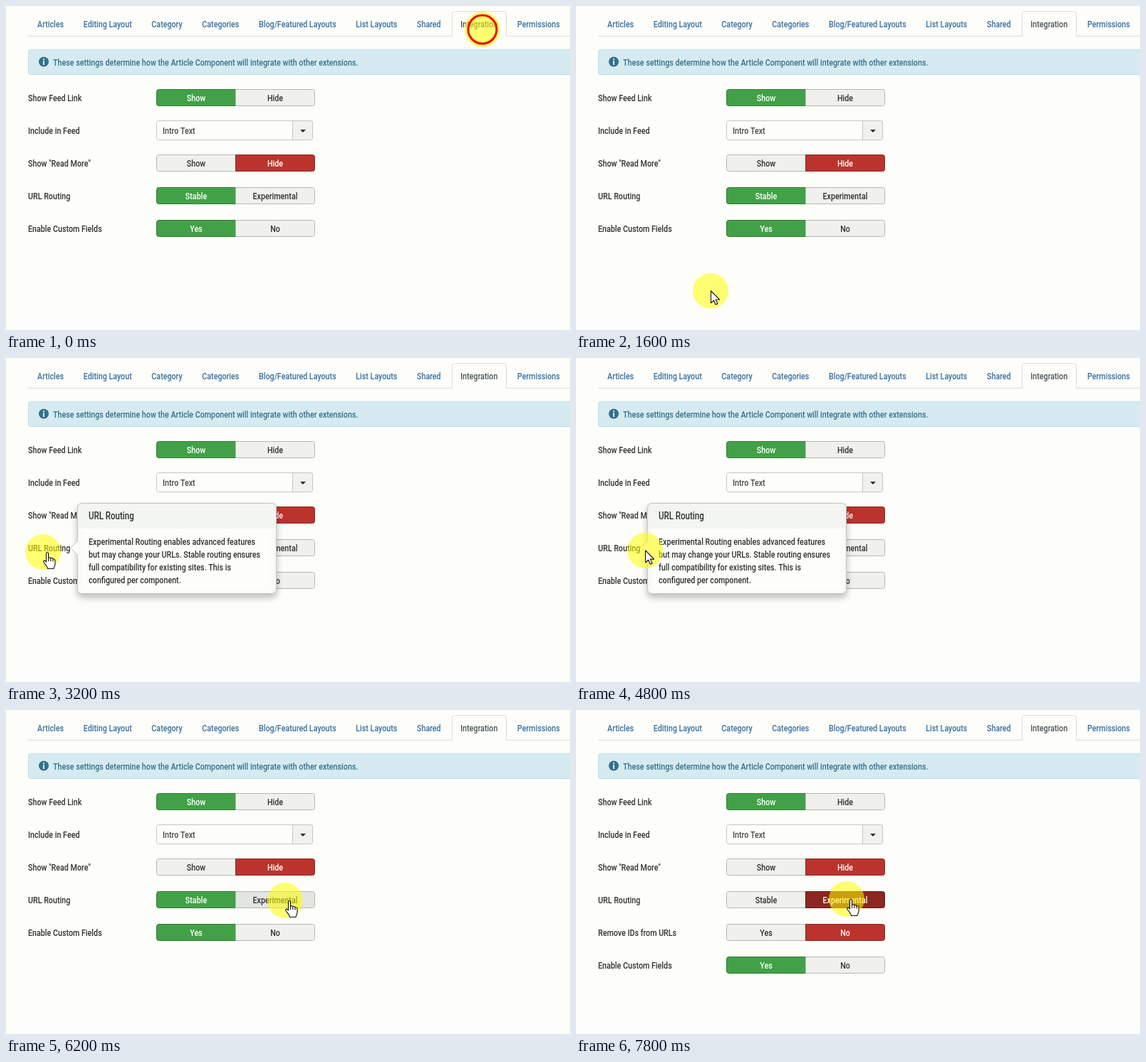
These frames come from a looping animation (792x456 px, 8000 ms). An HTML page with a canvas:

```html
<!DOCTYPE html>
<html lang="en">
<head>
<meta charset="utf-8">
<title>Integration settings</title>
<style>
html, body { margin: 0; width: 792px; height: 456px; overflow: hidden; background: #fdfef9; }
canvas { display: block; }
</style>
</head>
<body>
<canvas id="stage" width="792" height="456"></canvas>
<script>
const ctx = document.getElementById('stage').getContext('2d');
const LOOP = 8000, STEP = 200, CONDENSE = 0.824, ROW = 46;
const PAGE = '#fdfef9', INK = '#2f3230', LINK = '#3670a3', LINE = '#dcdfd9';
const INFO = ['#d5ebf1', '#bcdfe8'], INFO_INK = '#34708d';

// button styles: fill, border, text
const GREEN = ['#42a147', '#2f7c35', '#fff'], RED = ['#bb332c', '#8d2822', '#fff'];
const DARK_RED = ['#8c2721', '#671c18', '#fff'];
const OFF = ['#f0f1ed', '#b4b8b6', INK], HOVER = ['#e2e5e1', '#b4b8b6', INK];

const TABS = ['Articles', 'Editing Layout', 'Category', 'Categories', 'Blog/Featured Layouts',
  'List Layouts', 'Shared', 'Integration', 'Permissions'];

// pointer legs: start and end time, target, optional bend
const START = [669, 33];
const LEGS = [
  { from: 200, to: 1600, at: [189, 401], bend: [680, 440] },
  { from: 1600, to: 2400, at: [46, 279], bend: [5, 290] },
  { from: 2400, to: 2800, at: [52, 273] },
  { from: 4600, to: 5200, at: [226, 265] },
  { from: 5200, to: 6200, at: [392, 268] },
  { from: 6200, to: 7000, at: [380, 266] },
];

const clamp = v => Math.max(0, Math.min(1, v));
const progress = (t, from, to) => clamp((t - from) / (to - from));
const ease = k => k * k * (3 - 2 * k);

function pointerAt(t) {
  let pos = START;
  for (const { from, to, at, bend } of LEGS) {
    if (t < from) break;
    const k = ease(progress(t, from, to));
    pos = pos.map((p, i) => {
      const mid = bend ? bend[i] : (p + at[i]) / 2;
      return p * (1 - k) ** 2 + 2 * mid * k * (1 - k) + at[i] * k * k;
    });
  }
  return pos;
}

function setFont(size = 13) {
  ctx.font = `500 ${size}px Roboto, "Liberation Sans", sans-serif`;
}

// one condensed face for the whole page; y is the optical middle
function text(str, x, y, color = INK, align = 'left', size = 13) {
  ctx.save();
  ctx.translate(x, y + size * 0.36);
  ctx.scale(CONDENSE, 1);
  setFont(size);
  ctx.textAlign = align;
  ctx.fillStyle = color;
  ctx.fillText(str, 0, 0);
  ctx.restore();
}

function box(x, y, w, h, radii, [fill, border]) {
  ctx.beginPath();
  ctx.roundRect(x + 0.5, y + 0.5, w - 1, h - 1, radii);
  ctx.fillStyle = fill;
  ctx.fill();
  ctx.strokeStyle = border;
  ctx.lineWidth = 1;
  ctx.stroke();
}

function rect(x, y, w, h, color) {
  ctx.fillStyle = color;
  ctx.fillRect(x, y, w, h);
}

function disc(x, y, r, color) {
  ctx.beginPath();
  ctx.arc(x, y, r, 0, 7);
  ctx.fillStyle = color;
  ctx.fill();
}

function tabs() {
  rect(31, 42, 761, 1, LINE);
  let x = 44;
  for (const name of TABS) {
    const active = name === 'Integration';
    setFont();
    const w = ctx.measureText(name).width * CONDENSE;
    if (active) {
      box(Math.round(x) - 12, 7, Math.round(w) + 25, 40, [4, 4, 0, 0], [PAGE, LINE]);
      rect(x - 14, 43, w + 28, 5, PAGE);
    }
    text(name, x, 25.5, active ? '#4b5355' : LINK);
    x += w + 27.6;
  }
}

function notice() {
  box(31, 61, 780, 36, 3, INFO);
  disc(53, 78.5, 7, INFO_INK);
  rect(52, 74, 2, 2, INFO[0]);
  rect(52, 77, 2, 6, INFO[0]);
  text('These settings determine how the Article Component will integrate with other extensions.', 66, 79, INFO_INK);
}

function toggle(label, y, left, right, leftStyle, rightStyle) {
  text(label, 31, y);
  box(211, y - 12, 112, 24, [3, 0, 0, 3], leftStyle);
  box(322, y - 12, 112, 24, [0, 3, 3, 0], rightStyle);
  text(left, 267, y, leftStyle[2], 'center');
  text(right, 378, y, rightStyle[2], 'center');
}

function dropdown(label, y, value) {
  text(label, 31, y);
  box(211, y - 14, 220, 28, 3, [PAGE, '#c3c7c5']);
  box(402, y - 14, 29, 28, [0, 3, 3, 0], ['#f1f2ee', '#c3c7c5']);
  text(value, 220, y, '#454947');
  ctx.beginPath();
  ctx.moveTo(413, y - 1);
  ctx.lineTo(421, y - 1);
  ctx.lineTo(417, y + 3);
  ctx.fillStyle = INK;
  ctx.fill();
}

function form(t, x, y) {
  const picked = t >= 7200;
  const open = progress(t, 7000, 7600);
  const over = x > 322 && Math.abs(y - 267) < 12;
  const row = i => 129 + ROW * i;
  toggle('Show Feed Link', row(0), 'Show', 'Hide', GREEN, OFF);
  dropdown('Include in Feed', row(1), 'Intro Text');
  toggle('Show "Read More"', row(2), 'Show', 'Hide', OFF, RED);
  toggle('URL Routing', row(3), 'Stable', 'Experimental',
    picked ? OFF : GREEN, picked ? DARK_RED : over ? HOVER : OFF);
  ctx.save();
  ctx.beginPath();
  ctx.rect(0, 290, 792, ROW * open);
  ctx.clip();
  toggle('Remove IDs from URLs', row(4), 'Yes', 'No', OFF, RED);
  ctx.restore();
  toggle('Enable Custom Fields', row(4 + open), 'Yes', 'No', GREEN, OFF);
}

function tooltip(alpha) {
  if (!alpha) return;
  const style = [PAGE, '#c4c7c2'];
  ctx.save();
  ctx.globalAlpha = alpha;
  ctx.save();
  ctx.shadowColor = 'rgba(0,0,0,.25)';
  ctx.shadowBlur = 10;
  ctx.shadowOffsetY = 5;
  box(100, 204, 280, 128, 6, style);
  ctx.restore();
  box(100, 204, 280, 37, [6, 6, 0, 0], ['#f3f5f1', style[1]]);
  rect(101, 240, 278, 2, PAGE);
  ctx.beginPath();
  ctx.moveTo(101.5, 257);
  ctx.lineTo(91, 267.5);
  ctx.lineTo(101.5, 278);
  ctx.fill();
  ctx.stroke();
  text('URL Routing', 116, 222, INK, 'left', 14);
  ['Experimental Routing enables advanced features',
    'but may change your URLs. Stable routing ensures',
    'full compatibility for existing sites. This is',
    'configured per component.'].forEach((line, i) => text(line, 116, 258.5 + 18 * i));
  ctx.restore();
}

const ARROW = new Path2D('M0 0V17L4 13.3L6.6 19.3L9.4 18L6.8 12.2H12Z');
const HAND = new Path2D('M4.5 2C4.5 0 7.5 0 7.5 2V8.5C8.5 7.2 10.5 7.6 10.8 9C12 8 13.8 8.6 14 10' +
  'C15.4 9.4 17 10.2 17 12V17C17 20 15 21 15 23.5H6.5C6.5 21 4 18.5 1 14.5C-.2 12.6 2 11.4 3.4 12.8L4.5 14Z');
const KNUCKLES = new Path2D('M7.5 8.5V13M10.8 9V13M14 10V13.5');

function ring(x, y, age) {
  if (age < 0 || age >= 400) return;
  ctx.beginPath();
  ctx.arc(x, y, 20 + age / 50, 0, 7);
  ctx.strokeStyle = `rgba(235,10,5,${1 - age / 400})`;
  ctx.lineWidth = 3;
  ctx.stroke();
}

function pointer(t, x, y) {
  disc(x, y, 25, 'rgba(255,255,0,.55)');
  ring(x, y, t);
  ring(x, y, t - 7000);
  if (t < STEP) return;
  const hand = t >= 2800 && t < 4800 || t >= 5200;
  const shape = hand ? HAND : ARROW;
  ctx.save();
  ctx.translate(hand ? x : x + 0.5, y);
  ctx.fillStyle = '#fff';
  ctx.fill(shape);
  ctx.strokeStyle = '#111';
  ctx.lineWidth = 1.1;
  ctx.lineJoin = 'round';
  ctx.stroke(shape);
  if (hand) ctx.stroke(KNUCKLES);
  ctx.restore();
}

function draw(now) {
  const t = Math.floor(now % LOOP / STEP) * STEP;
  const [x, y] = pointerAt(t);
  rect(0, 0, 792, 456, PAGE);
  tabs();
  notice();
  form(t, x, y);
  tooltip(t < 5000 ? progress(t, 2600, 3000) : 0);
  pointer(t, x, y);
  requestAnimationFrame(draw);
}
draw(0);
</script>
</body>
</html>
```
